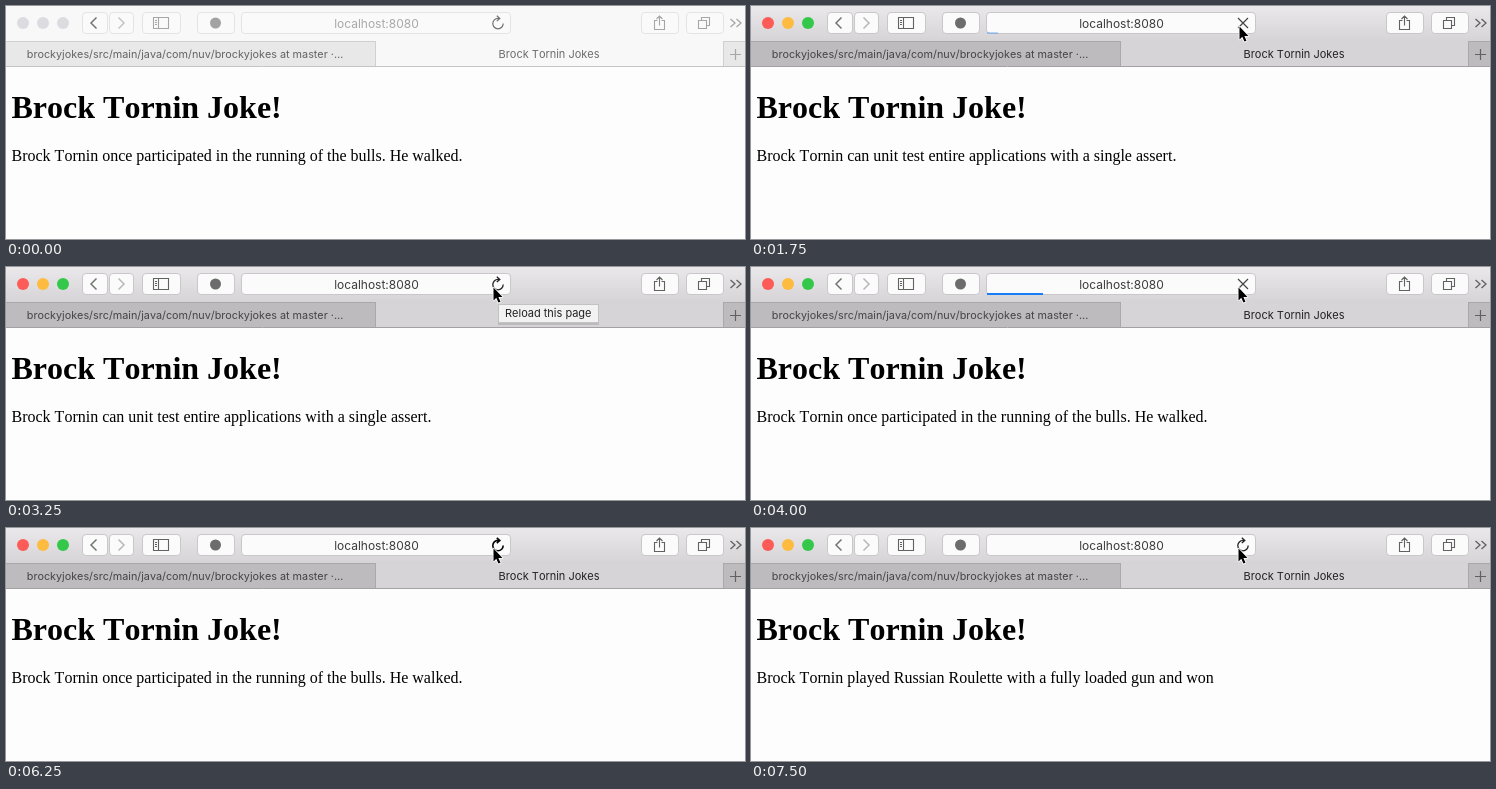
An HTML page for the animation above (8000 ms loop, 739 by 233 pixels).

```html
<!DOCTYPE html>
<html lang="en">
<head>
<meta charset="utf-8">
<title>Joke page reload</title>
<style>
  html, body { margin: 0; width: 100%; height: 100%; overflow: hidden; background: #fdfdfd; }
  svg {
    display: block; width: 100%; height: 100%;
    --bar-top: #f8f8f8; --bar-bottom: #f8f8f8; --tab: #e8e8e8; --front: #f8f8f8;
    --line: #d0d0d0; --edge: #c4c4c4; --button: #fafafa; --button-edge: #e4e4e4;
    --icon: #a6a6a6; --back: #747474; --forward: #c4c4c4; --reload: #707070; --badge: #a2a2a2;
    --address: #a9a9a9; --tab-text: #626262; --front-text: #6c6c6c;
    --red: #dcdce0; --amber: #dcdce0; --green: #dcdce0;
  }
  svg.active {
    --bar-top: #eae8ea; --bar-bottom: #d5d3d5; --tab: #bdbbbd; --front: #d6d4d6;
    --line: #aaa8aa; --edge: #a3a1a3; --button: #fbfbfb; --button-edge: #c9c7c9;
    --icon: #616161; --back: #747474; --forward: #b8b8b8; --reload: #333; --badge: #6c6c6c;
    --address: #3c3c3c; --tab-text: #444; --front-text: #222;
    --red: #fc5b57; --amber: #fdbc40; --green: #34c84a;
  }
  text { font: 11px Inter, "Open Sans", sans-serif; font-kerning: none; white-space: pre; }
  .page { font-family: "Liberation Serif", "Times New Roman", serif; font-size: 16px; }
  .heading { font-size: 32px; font-weight: bold; }
  .button { fill: var(--button); stroke: var(--button-edge); }
  .icon { fill: none; stroke: var(--icon); stroke-width: 1.1; }
</style>
</head>
<body>
<svg id="stage" viewBox="0 0 739 233" preserveAspectRatio="none">
  <defs>
    <linearGradient id="bar" x2="0" y2="1">
      <stop style="stop-color:var(--bar-top)"/>
      <stop offset="1" style="stop-color:var(--bar-bottom)"/>
    </linearGradient>
  </defs>
  <rect width="739" height="233" fill="#fdfdfd"/>

  <!-- Toolbar -->
  <rect width="739" height="36" fill="url(#bar)"/>
  <circle cx="17" cy="17" r="6" fill="var(--red)"/>
  <circle cx="37" cy="17" r="6" fill="var(--amber)"/>
  <circle cx="57" cy="17" r="6" fill="var(--green)"/>
  <g id="buttons"></g>
  <path class="icon" d="M90.5 11.5L85 17l5.5 5.5" style="stroke:var(--back);stroke-width:1.5"/>
  <path class="icon" d="M112.5 11.5L118 17l-5.5 5.5" style="stroke:var(--forward);stroke-width:1.5"/>
  <path class="icon" d="M147.5 11.5h15v11h-15zM152.5 11.5v11M149 14.5h2M149 16.5h2M149 18.5h2"/>
  <circle cx="209.5" cy="17" r="5.5" fill="var(--badge)"/>
  <path class="icon" d="M651.5 14.5h-3v9h10v-9h-3M653.5 19.5v-9M650.5 13l3-3 3 3"/>
  <path class="icon" d="M692.5 14.5h8v8h-8zM695.5 14.5v-3h8v8h-3"/>
  <path class="icon" d="M724.5 13l4.5 4-4.5 4M730.5 13l4.5 4-4.5 4" style="stroke-width:1.3"/>
  <text x="370.5" y="21.5" text-anchor="middle" style="font-size:12px" fill="var(--address)">localhost:8080</text>
  <rect id="progress" x="236" y="26" height="2" fill="#1a7df8"/>
  <path id="reload" fill="none" d="M497.2 17.6A5.2 5.2 0 1 1 492 12.4h1.5M490.8 9.8l3 2.6-3 2.7"/>
  <path id="stop" d="M487 12l10 10M497 12l-10 10" stroke="#444" stroke-width="1.2"/>

  <!-- Tabs -->
  <rect y="36" width="739" height="24" fill="var(--tab)"/>
  <rect x="370" y="36" width="347" height="24" fill="var(--front)"/>
  <path d="M0 35.5H370M717 35.5H739M369.5 36V60M717.5 36V60" stroke="var(--line)"/>
  <path d="M0 60.5H739" stroke="var(--edge)"/>
  <path d="M724 48.5h11M729.5 43v11" stroke="var(--icon)" stroke-width="1.2"/>
  <text x="179" y="52" text-anchor="middle" style="font-size:10.8px" fill="var(--tab-text)">brockyjokes/src/main/java/com/nuv/brockyjokes at master ·…</text>
  <text x="543" y="52" text-anchor="middle" fill="var(--front-text)">Brock Tornin Jokes</text>
  <path id="close" d="M379.5 44.5l7 7M386.5 44.5l-7 7" stroke="#777" stroke-width="1.1"/>

  <!-- Page -->
  <text class="page heading" x="5.5" y="112">Brock Tornin Joke!</text>
  <text class="page" id="joke" x="5.5" y="155"></text>

  <g id="tooltip">
    <rect x="492" y="39" width="101" height="19" fill="#000" opacity=".12"/>
    <rect x="492.5" y="37.5" width="100" height="18" fill="#f3f2f3" stroke="#c3c2c3"/>
    <text x="499" y="50" fill="#222">Reload this page</text>
  </g>
  <path id="cursor" d="M.5 .5V13.5L3.3 10.8 5.4 15.6 7.5 14.7 5.4 9.9H9.5Z" fill="#000" stroke="#fff" stroke-width="1.6" stroke-linejoin="round" paint-order="stroke"/>
</svg>
<script>
const $ = id => document.getElementById(id);
const LOOP = 8000;

// Left edge and width of each toolbar field.
$('buttons').innerHTML = [[76, 25], [103, 24], [136, 38], [191, 37], [235, 269], [635, 37], [680, 37]]
  .map(([x, w]) => `<rect class="button" x="${x + .5}" y="6.5" width="${w}" height="21" rx="3.5"/>`)
  .join('');

const jokes = [
  'once participated in the running of the bulls. He walked.',
  'can unit test entire applications with a single assert.',
  'played Russian Roulette with a fully loaded gun and won',
].map(rest => 'Brock Tornin ' + rest);

const initial = {
  active: false, joke: 0, cursor: null, close: 0, tooltip: 0,
  loading: false, progress: 0, glow: 1, reload: 'var(--reload)', weight: 1.2,
};
const hovered = { reload: '#222', weight: 1.3 };
const pressed = { reload: '#000', weight: 1.6 };
const loaded = { loading: false, progress: 268, glow: .5 };
const idle = { progress: 0 };
const load = (joke, progress, glow = 1) => ({ ...hovered, loading: true, joke, progress, glow });

// Each step changes part of the state and holds until the next.
const steps = [
  [250, { cursor: [544, 43], close: .6 }],
  [500, { cursor: [521, 38], close: 1 }],
  [750, { cursor: [514, 28], close: 0 }],
  [1000, { cursor: [505, 24] }],
  [1250, { cursor: [492, 20], ...hovered }],
  [1500, { cursor: [488, 20] }],
  [1750, { active: true, ...load(1, 11, .3) }],
  [2000, { progress: 233, glow: 1 }],
  [2250, loaded],
  [2500, idle],
  [3250, { cursor: [487, 20], tooltip: 1 }],
  [3750, { tooltip: 0, ...pressed }],
  [4000, load(0, 56)],
  [4250, loaded],
  [4500, idle],
  [6250, pressed],
  [6500, load(2, 56)],
  [6750, loaded],
  [7000, idle],
];

const show = (id, visible) => $(id).setAttribute('opacity', +visible);

function draw(time) {
  const s = Object.assign({}, initial, ...steps.filter(([at]) => at <= time).map(([, change]) => change));
  $('stage').classList.toggle('active', s.active);
  $('joke').textContent = jokes[s.joke];
  $('progress').setAttribute('width', s.progress);
  show('progress', s.glow);
  $('reload').style.stroke = s.reload;
  $('reload').style.strokeWidth = s.weight;
  show('reload', !s.loading);
  show('stop', s.loading);
  show('close', s.close);
  show('tooltip', s.tooltip);
  show('cursor', s.cursor !== null);
  if (s.cursor) $('cursor').setAttribute('transform', `translate(${s.cursor})`);
}

const start = performance.now();
function tick() {
  draw((performance.now() - start) % LOOP);
  requestAnimationFrame(tick);
}
tick();
</script>
</body>
</html>
```
